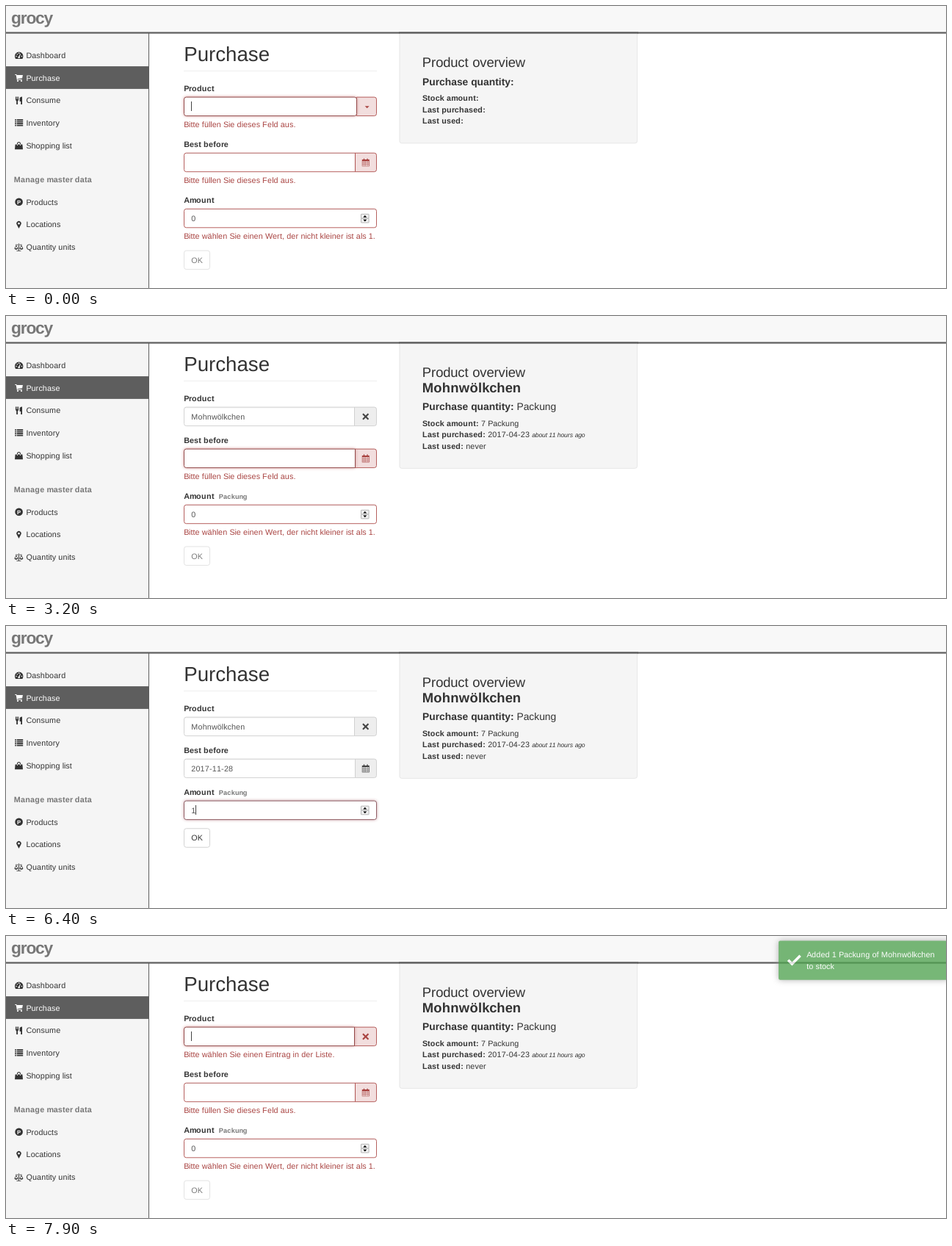
These frames come from a looping animation (1280x384 px, 8 s). An HTML page with a canvas:

```html
<!DOCTYPE html>
<html lang="de">
<head>
<meta charset="utf-8">
<title>Purchase</title>
<style>
  html, body { margin: 0; width: 100%; height: 100%; overflow: hidden; background: #fff; }
  canvas { display: block; width: 1280px; height: 384px; }
</style>
</head>
<body>
<canvas id="stage" width="1280" height="384"></canvas>
<script>
const stage = document.getElementById('stage').getContext('2d');
let ctx = stage;
const LOOP = 8000;
const ZOOM = 0.769; // the page is shown at this scale
const FACE = '"Liberation Sans", Arial, sans-serif';
const RED = '#a94442';
const ITEM = 'Mohnwölkchen';
const FILL_IN = 'Bitte füllen Sie dieses Feld aus.';
const TOO_SMALL = 'Bitte wählen Sie einen Wert, der nicht kleiner ist als 1.';

// Input looks: border colour and glow (rgba)
const LOOKS = {
  ok: [[204, 204, 204], [206, 132, 131, 0]],
  err: [[169, 68, 66], [206, 132, 131, 0]],
  errFocus: [[132, 53, 52], [206, 132, 131, 1]],
  okFocus: [[102, 175, 233], [102, 175, 233, 0.8]]
};
const mix = (a, b, p) => a.map((v, i) => v + (b[i] - v) * p);
const fade = (from, to, p) => LOOKS[from].map((c, i) => mix(c, LOOKS[to][i], p));

// Each step changes some values of the form and keeps the rest
const caret = (field, pos) => ({ caret: field && [field, pos] });
const STEPS = [
  [0, {
    picked: false, product: '', productErr: FILL_IN, productLook: LOOKS.errFocus,
    date: '', dateErr: FILL_IN, dateLook: LOOKS.err,
    amount: '0', amountErr: TOO_SMALL, amountLook: LOOKS.err,
    caret: ['product', 0], toast: 0
  }],
  [200, caret()],
  [700, caret('product', 0)],
  [1200, caret()],
  [1300, { product: '2000', caret: ['product', 4] }],
  [1400, { product: '20001234', caret: ['product', 8] }],
  [1500, { product: '2000123400017', caret: ['product', 13] }],
  [1600, {
    picked: true, product: ITEM, productErr: '', caret: ['date', 0],
    productLook: fade('errFocus', 'ok', 0.4), dateLook: fade('err', 'errFocus', 0.4)
  }],
  [1700, { productLook: LOOKS.ok, dateLook: LOOKS.errFocus }],
  [2100, caret()],
  [2600, caret('date', 0)],
  [3200, caret()],
  [3700, caret('date', 0)],
  [4200, caret()],
  [4400, { date: '1', caret: ['date', 1] }],
  [4600, { date: '11', dateErr: 'Wrong date format, needs to be YYYY-MM-DD', caret: ['date', 2] }],
  [4900, { date: '112', caret: ['date', 3] }],
  [5200, { date: '2017-11-28', dateErr: '', caret: ['amount', 1] }],
  [5300, { dateLook: fade('errFocus', 'ok', 0.85), amountLook: fade('err', 'errFocus', 0.85) }],
  [5400, { dateLook: LOOKS.ok, amountLook: LOOKS.errFocus }],
  [5800, caret()],
  [6300, caret('amount', 1)],
  [6400, { amount: '1', amountErr: '', amountLook: fade('errFocus', 'okFocus', 0.15) }],
  [6500, { amountLook: LOOKS.okFocus }],
  [6900, caret()],
  [7400, caret('amount', 1)],
  [7700, {
    product: '', productErr: 'Bitte wählen Sie einen Eintrag in der Liste.',
    date: '', dateErr: FILL_IN, amount: '0', amountErr: TOO_SMALL,
    caret: ['product', 0], toast: 0.11
  }],
  [7800, {
    productLook: fade('ok', 'errFocus', 0.85), dateLook: fade('ok', 'err', 0.85),
    amountLook: fade('okFocus', 'err', 0.85), toast: 0.5
  }],
  [7900, { productLook: LOOKS.errFocus, dateLook: LOOKS.err, amountLook: LOOKS.err, toast: 0.78 }]
];

const box = (x, y, w, h) => `M${x} ${y}h${w}v${h}h${-w}Z`;
const ICONS = {
  gauge: 'M0 6A5.7 5.7 0 0 1 11.4 6Q11.4 8.3 10.4 9.8H1Q0 8.3 0 6Z' +
    box(1.3, 5.6, 1.4, 1.4) + box(2.7, 2.7, 1.4, 1.4) + box(5, 1.3, 1.4, 1.4) + box(8.7, 5.6, 1.4, 1.4) +
    'M7.2 2.8L8 3.1 6.8 6.7A1.4 1.4 0 1 1 5.6 6.2Z',
  cart: 'M0 0H2L2.4 1.2H10.6L9.8 5.4 3.3 6.1 3.5 6.9H9.5V7.8H2.6L1.4 1H0Z' +
    box(2.8, 8.3, 1.8, 1.8) + box(7.8, 8.3, 1.8, 1.8),
  cutlery: 'M0 0H1V3.4H1.6V0H2.6V3.4H3.2V0H4.2V4.2Q4.2 5.2 3 5.6V10.5H1.2V5.6Q0 5.2 0 4.2Z' +
    'M9 0V10.5H7.2V6.5H5.6V2.6Q5.8 0 9 0Z',
  list: [0, 2.5, 5, 7.5].map(y => box(0, y, 1.7, 1.6) + box(2.5, y, 8.5, 1.6)).join(''),
  bag: 'M.6 3.6H10.4L11 10.3H0ZM3 5V2.5A2.5 2.5 0 0 1 8 2.5V5H7V2.6A1.5 1.5 0 0 0 4 2.6V5Z',
  marker: 'M3.2 10.4L.6 5.2A3.2 3.2 0 1 1 5.8 5.2ZM3.2 2.1A1.4 1.4 0 1 0 3.2 4.9A1.4 1.4 0 1 0 3.2 2.1Z',
  scale: box(1.5, 1.3, 9, 0.9) + box(5.5, 0, 1, 9.5) + box(3, 9.5, 6, 0.9) +
    'M2.5 2.2L5 6.5A2.5 1.8 0 0 1 0 6.5ZM2.5 3.6L1 6.5H4Z' +
    'M9.5 2.2L12 6.5A2.5 1.8 0 0 1 7 6.5ZM9.5 3.6L8 6.5H11Z',
  calendar: box(0, 1.4, 10, 9.2) + box(2, 0, 1.4, 1.4) + box(6.6, 0, 1.4, 1.4) +
    [0, 1, 2, 3].map(c => [0, 1, 2].map(r => box(0.6 + c * 2.3, 3.7 + r * 2.25, 1.85, 1.8)).join('')).join(''),
  cross: 'M1.5 0L4.5 3 7.5 0 9 1.5 6 4.5 9 7.5 7.5 9 4.5 6 1.5 9 0 7.5 3 4.5 0 1.5Z',
  down: 'M0 0H6L3 3.1Z',
  check: 'M0 8L2.6 5.4 6.6 9.4 16.5 -.5 19 2 6.6 14.4Z'
};

function icon(name, x, y, color) {
  ctx.save();
  ctx.translate(x, y);
  ctx.fillStyle = color;
  ctx.fill(new Path2D(ICONS[name]), 'evenodd');
  ctx.restore();
}

// Sets text with whole-pixel advances at page size; returns its right end
function text(str, x, y, color = '#333', size = 14, style = '') {
  ctx.textRendering = 'geometricPrecision';
  ctx.font = `${style} ${size * ZOOM}px ${FACE}`;
  ctx.fillStyle = color;
  for (const char of str) {
    ctx.fillText(char, x, y);
    x += Math.round(ctx.measureText(char).width / ZOOM) * ZOOM;
  }
  return x;
}

function rect(x, y, w, h, color) {
  ctx.fillStyle = color;
  ctx.fillRect(x, y, w, h);
}

function panel(x, y, w, h, radii, fill, border) {
  ctx.beginPath();
  ctx.roundRect(x, y, w, h, radii);
  ctx.fillStyle = fill;
  ctx.fill();
  ctx.shadowColor = 'transparent';
  ctx.lineWidth = 0.85;
  ctx.strokeStyle = border;
  ctx.stroke();
}

function logo() {
  ctx.font = `bold 22.8px ${FACE}`;
  ctx.letterSpacing = '-1.2px';
  ctx.fillStyle = '#777';
  ctx.fillText('grocy', 7, 24.3);
  ctx.letterSpacing = '0px';
}

function frame() {
  rect(0, 0, 1280, 384, '#fff');
  rect(0, 0, 1280, 36, '#f8f8f8');
  rect(0, 37, 194, 347, '#f5f5f5');
  rect(194, 37, 1, 347, '#5e5e5e');
  rect(0, 35.4, 1280, 2.2, '#5e5e5e');
  logo();

  rect(0, 82.1, 194, 30.8, '#5e5e5e');
  const link = (label, name, x, y, color = '#333') => {
    text(label, 27.5, y + 3.8, color);
    if (name) icon(name, x, y - 4.8, color);
  };
  link('Dashboard', 'gauge', 12, 67);
  link('Purchase', 'cart', 12.3, 97.7, '#fff');
  link('Consume', 'cutlery', 13, 128.4);
  link('Inventory', 'list', 12.2, 159.1);
  link('Shopping list', 'bag', 12, 189.8);
  text('Manage master data', 10.8, 239.8, '#777', 14, 'bold');
  link('Products', '', 0, 266.8);
  link('Locations', 'marker', 14.3, 297.5);
  link('Quantity units', 'scale', 11.4, 328.2);
  ctx.fillStyle = '#333';
  ctx.beginPath();
  ctx.arc(17.6, 266.7, 5.3, 0, 7);
  ctx.fill();
  text('P', 15, 269.5, '#fff', 10, 'bold');

  text('Purchase', 242.2, 75.4, '#333', 36);
  rect(242, 88, 263, 1, '#eee');
}

function overview(s) {
  const dy = s.picked ? 20.6 : 0;
  panel(535.9, 37.6, 323.6, 149.2 + dy, [0, 0, 3, 3], '#f5f5f5', '#e3e3e3');
  rect(535, 35.4, 326, 2.2, '#5e5e5e');
  text('Product overview', 566.8, 83.2, '#333', 24);
  if (s.picked) text(ITEM, 566.8, 103.8, '#333', 24, 'bold');
  const row = (label, value, y, size) => {
    const x = text(label + ' ', 567, y + dy, '#333', size, 'bold');
    return s.picked ? text(value, x, y + dy, '#333', size) : x;
  };
  row('Purchase quantity:', 'Packung', 107.6, 18);
  row('Stock amount:', '7 Packung', 129.3);
  const x = row('Last purchased:', '2017-04-23 ', 144.7);
  if (s.picked) text('about 11 hours ago', x, 144.7 + dy, '#333', 11.2, 'italic');
  row('Last used:', 'never', 160.1);
}

function spinner(y) {
  panel(483.5, y + 7.1, 10.6, 5.8, 0.5, '#f0f0f0', '#aaa');
  panel(483.5, y + 12.9, 10.6, 5.8, 0.5, '#f0f0f0', '#aaa');
  ctx.fillStyle = '#000';
  ctx.fill(new Path2D(`M486.3 ${y + 11.4}h5l-2.5 -2.7ZM486.3 ${y + 14.4}h5l-2.5 2.7Z`));
}

// Draws label, input and message; returns the place of the next group
function group(s, key, label, y, addon) {
  const err = s[key + 'Err'], [border, glow] = s[key + 'Look'];
  const top = y + 12.1, h = 25.5;
  const end = text(label, 242.2, y + 3.9, '#333', 14, 'bold');
  if (key === 'amount' && s.picked) text('Packung', end + 6, y + 3.9, '#777', 11.9, 'bold');

  const split = addon === 'down' ? 477.5 : addon === 'cross' ? 474.5 : 475.5;
  if (addon) {
    const tone = err ? RED : '#444';
    panel(split, top, 504.5 - split, h, [0, 3, 3, 0], err ? '#f2dede' : '#eee', err ? RED : '#ccc');
    if (addon === 'down') icon('down', 488.7, top + 12.1, tone);
    else if (addon === 'cross') icon('cross', 485.2, top + 8.3, tone);
    else icon('calendar', 484.8, top + 7.5, tone);
  }
  ctx.shadowBlur = 4.6;
  ctx.shadowColor = `rgba(${glow})`;
  const right = addon ? split : 504.5;
  panel(242.5, top, right - 242.5, h, addon && addon !== 'down' ? [3, 0, 0, 3] : 3, '#fff', `rgb(${border})`);
  rect(244, top + 0.5, right - 245, 0.8, 'rgba(0,0,0,.06)');
  if (!addon) spinner(top);

  text(s[key], 252.3, y + 28.9, '#555');
  if (s.caret && s.caret[0] === key) {
    rect(Math.floor(252.3 + s.caret[1] * 8 * ZOOM), Math.round(y + 18), 1, 13, '#444');
  }
  if (err) text(err, 242.2, y + 53.1, RED);
  return y + (err ? 76.1 : 57);
}

// The toast fades as one piece, so it is painted once on its own layer
function makeToast() {
  const layer = document.createElement('canvas');
  layer.width = 240;
  layer.height = 80;
  ctx = layer.getContext('2d');
  ctx.translate(-1040, 0);
  ctx.beginPath();
  ctx.roundRect(1052, 6.4, 231, 53.4, 2.3);
  ctx.fillStyle = '#51a351';
  ctx.shadowBlur = 9;
  ctx.shadowColor = '#999';
  ctx.fill();
  ctx.shadowColor = 'transparent';
  icon('check', 1063.8, 26, '#fff');
  text(`Added 1 Packung of ${ITEM}`, 1090.2, 29.2, '#fff');
  text('to stock', 1090.2, 44.6, '#fff');
  ctx = stage;
  return layer;
}
const toast = makeToast();

function draw(s) {
  ctx.textRendering = 'geometricPrecision';
  frame();
  overview(s);
  let y = group(s, 'product', 'Product', 112, s.picked ? 'cross' : 'down');
  y = group(s, 'date', 'Best before', y, 'calendar');
  y = group(s, 'amount', 'Amount', y);
  ctx.globalAlpha = s.productErr || s.dateErr || s.amountErr ? 0.65 : 1;
  panel(242.5, y - 7.2, 35, 25.5, 3, '#fff', '#ccc');
  text('OK', 252.3, y + 9.4);
  ctx.globalAlpha = s.toast;
  ctx.drawImage(toast, 1040, 0);
  ctx.globalAlpha = 1;
}

let shown = -1;
function tick() {
  const t = performance.now() % LOOP;
  const past = STEPS.filter(([at]) => at <= t);
  if (past.length !== shown) {
    shown = past.length;
    draw(Object.assign({}, ...past.map(([, change]) => change)));
  }
  requestAnimationFrame(tick);
}
tick();
</script>
</body>
</html>
```
